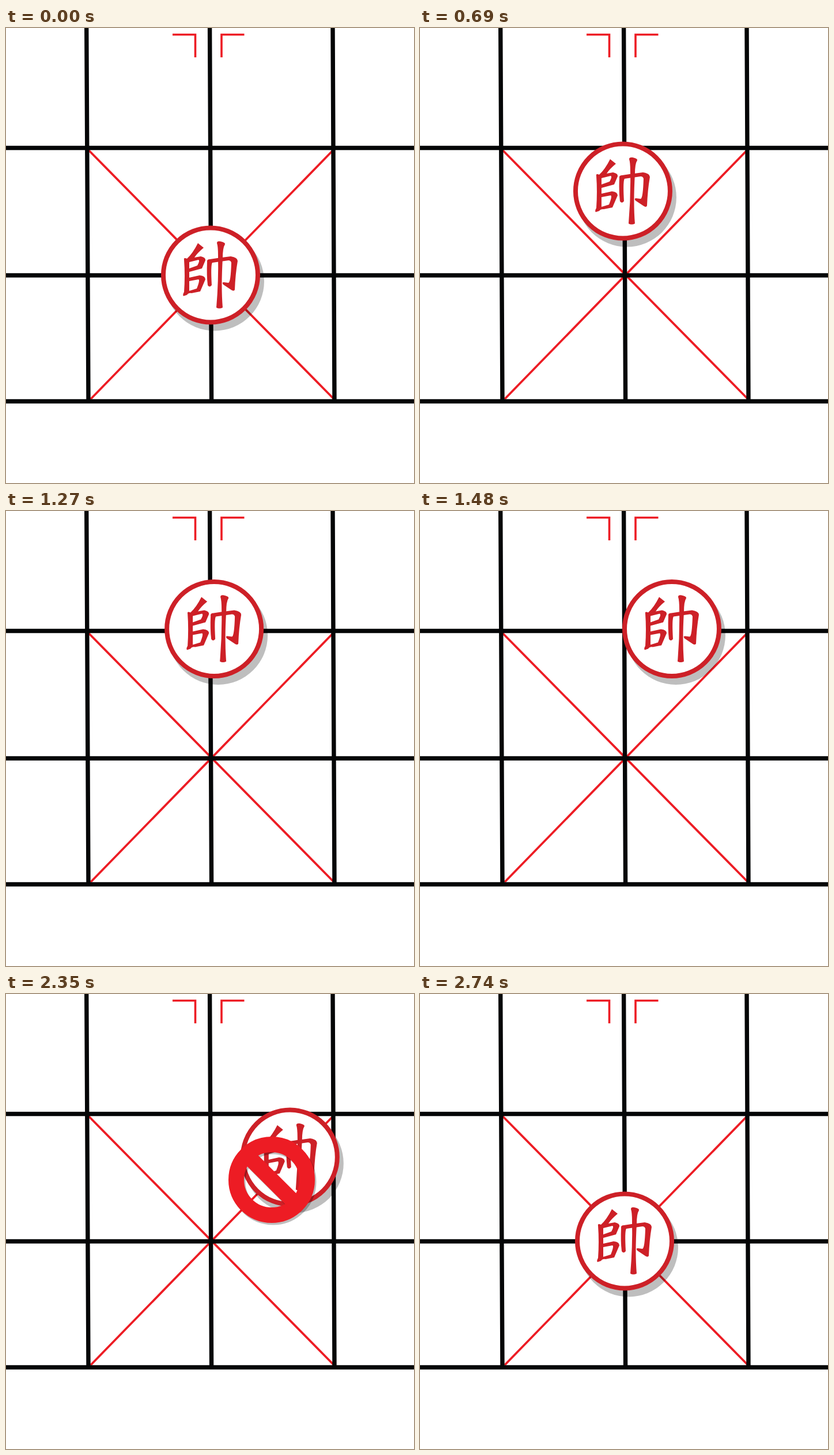
Write an HTML page that moves like this. It is 708 by 791 pixels and loops after 3.07 s.

```html
<!DOCTYPE html>
<html lang="zh-Hant">
<head>
<meta charset="utf-8">
<title>Xiangqi general</title>
<style>
  html, body { margin: 0; width: 100%; height: 100%; overflow: hidden; background: #fff; }
  svg { display: block; width: 100vw; height: 100vh; }
  .shade { opacity: .25; filter: blur(.6px); }
</style>
</head>
<body>
<svg viewBox="0 0 708 791" fill="none">
  <defs>
    <g id="ban">
      <circle r="61.5"/>
      <path d="M-40-40L40 40"/>
    </g>
  </defs>

  <g stroke="#ed1c24">
    <path stroke-width="3.8" d="M143 212L569 645M567 213L147 645"/>
    <path stroke-width="3.6" d="M289 11.5H328.5V51M413.5 11.5H374V51"/>
  </g>
  <g stroke="#050607" stroke-width="7.4">
    <path d="M0 208.5H708M0 430H708M0 649H708"/>
    <path d="M139.7 0L143 649M353.6 0L356.6 649M567 0L570 649"/>
  </g>

  <g id="piece">
    <circle class="shade" cx="7" cy="11" r="86" fill="#000"/>
    <circle r="82" fill="#fff" stroke="#cd2027" stroke-width="8"/>
    <g role="img" aria-label="帥" fill="#cd2027" transform="translate(-355 -429.5)">
      <path fill-rule="evenodd" d="M333 374L343 382Q332 391 327 399L338 397Q347 399 346 404L340 418L318 424V434L336 430Q346 431 346 437L337 458L322 461Q317 460 314 464L308 466Q306 464 309 459Q311 430 309 403Q308 398 314 401Q324 392 333 374Z
        M318 407L334 403Q337 404 332 413L318 418ZM318 440L334 437Q337 438 331 453L318 457Z"/>
      <path d="M349 407Q348 402 354 402L367 400L390 397Q402 399 402 405Q398 428 397 455Q396 458 392 456L377 446Q374 442 378 442L386 443Q390 442 391 408Q390 404 386 404L358 408Q355 412 357 447Q353 452 350 447Q348 430 349 407Z"/>
      <path d="M366 374Q366 370 372 371Q381 373 380 376Q376 382 376 400Q373 450 376 486Q370 489 365 486Q369 440 368 395Q368 380 366 374Z"/>
    </g>
  </g>

  <g id="sign" stroke-width="27">
    <use class="shade" href="#ban" x="463.5" y="326.5" stroke="#000"/>
    <use href="#ban" x="461" y="323" stroke="#ed1c24"/>
  </g>
</svg>
<script>
  const LOOP = 3070, TICK = 30, STEPS = 20;
  const stops = [[355, 429.5], [350.3, 205], [567, 205], [355, 429.5]];
  const starts = [300, 1240, 2140];
  const piece = document.getElementById('piece');
  const sign = document.getElementById('sign');

  // Fraction of a move done, advancing in fixed ticks
  const progress = (t, start) =>
    Math.min(STEPS, Math.max(0, Math.floor((t - start) / TICK))) / STEPS;

  function draw(now) {
    const t = now % LOOP;
    let [x, y] = stops[0];
    starts.forEach((start, i) => {
      const p = progress(t, start);
      x += (stops[i + 1][0] - stops[i][0]) * p;
      y += (stops[i + 1][1] - stops[i][1]) * p;
    });
    piece.setAttribute('transform', `translate(${x} ${y})`);
    const last = progress(t, starts[2]);
    sign.setAttribute('visibility', last > 0 && last < 1 ? 'visible' : 'hidden');
  }

  const begin = performance.now();
  function loop() {
    draw(performance.now() - begin);
    requestAnimationFrame(loop);
  }
  loop();
</script>
</body>
</html>
```
